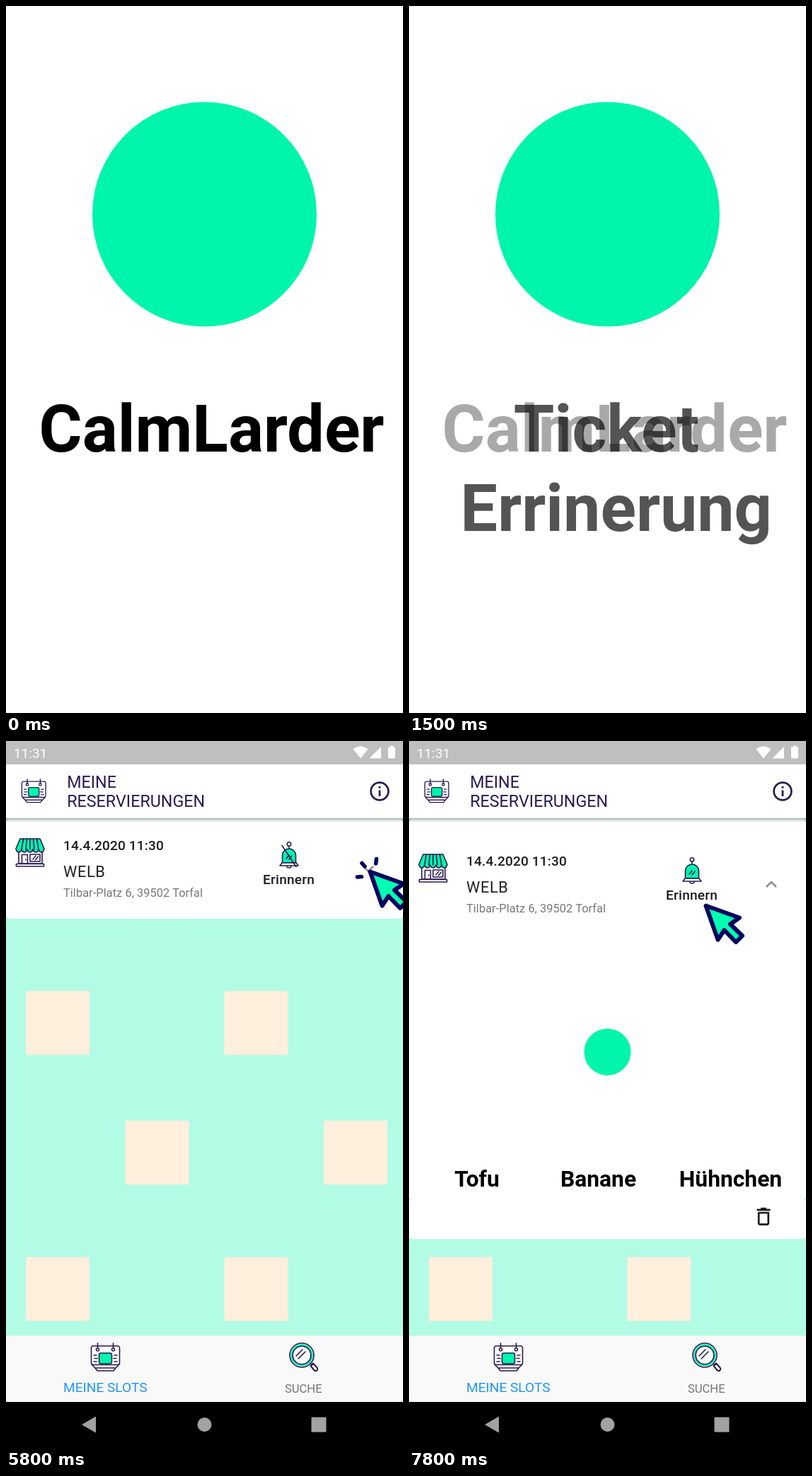
An HTML page without scripts for the animation above (8 s loop, 561 by 998 pixels).

```html
<!DOCTYPE html>
<html lang="de">
<head>
<meta charset="utf-8">
<title>Ticket Erinnerung</title>
<style>
  html, body { margin: 0; width: 100%; height: 100%; overflow: hidden; background: #fff; }
  svg { display: block; }
  .stage { width: 100vw; height: 100vh; }
  text { font-family: Roboto, "Open Sans", sans-serif; }
  .mid { text-anchor: middle; }
  .title { font-size: 93.4px; font-weight: 700; }
  .head { font-size: 23.3px; fill: #2a1a52; }
  .date { font-size: 19.1px; font-weight: 500; letter-spacing: .14px; fill: #1c1c1c; }
  .shop { font-size: 21.8px; letter-spacing: .6px; fill: #212121; }
  .addr { font-size: 16.4px; letter-spacing: .05px; fill: #777; }
  .remind { font-size: 19.1px; font-weight: 500; letter-spacing: .25px; fill: #1c1c1c; }
  .item { font-size: 31.8px; font-weight: 700; }
  .line { fill: none; stroke: #2a1a52; stroke-width: 1.6; stroke-linecap: round; stroke-linejoin: round; }
  .mint { fill: #00f5ac; }
  .pale { fill: #fff; }
  .chev { fill: none; stroke: #8d8d8d; stroke-width: 2.6; }
  .ink { fill: none; stroke: #04005f; stroke-width: 6; stroke-linecap: round; stroke-linejoin: round; }

  /* Everything shares one 8 s clock; values hold until the next key */
  .out, .in, .app, .closed, .open, .row, .cursor, .pos, .rays, .slash { animation: 8s step-end infinite; }
  .out { animation-name: out; }
  .in { animation-name: in; }
  .app { animation-name: app; }
  .open { animation-name: open; }
  .closed { animation-name: closed; }
  .row { animation-name: row; }
  .cursor { animation-name: cursor; }
  .pos { animation-name: pos; }
  .rays { animation-name: rays; }
  .slash { animation-name: slash; }

  @keyframes out {
    0% { opacity: 1; }
    12.5% { opacity: 1; animation-timing-function: steps(9, start); }
    23.75%, 100% { opacity: 0; }
  }
  @keyframes in {
    0% { opacity: 0; }
    12.5% { opacity: 0; animation-timing-function: steps(9, start); }
    23.75%, 100% { opacity: 1; }
  }
  @keyframes app { 0% { opacity: 0; } 47.5%, 100% { opacity: 1; } }
  @keyframes open { 0% { opacity: 0; } 75%, 100% { opacity: 1; } }
  @keyframes closed { 0% { opacity: 1; } 75%, 100% { opacity: 0; } }
  @keyframes row { 0% { transform: none; } 75%, 100% { transform: translateY(22px); } }
  @keyframes cursor { 0% { opacity: 0; } 60%, 100% { opacity: 1; } }
  @keyframes pos {
    0% { transform: translate(511px, 181px); }
    75% { transform: translate(511px, 197px); }
    81.25% { transform: translate(511px, 197px); animation-timing-function: steps(4, start); }
    86.25% { transform: translate(394px, 183px); }
    93.75% { transform: translate(394px, 183px); animation-timing-function: steps(4, start); }
    98.75%, 100% { transform: translate(416px, 229px); }
  }
  @keyframes rays {
    0% { opacity: 0; }
    72.5% { opacity: 1; }
    75% { opacity: 0; }
    91.25% { opacity: 1; }
    93.75%, 100% { opacity: 0; }
  }
  @keyframes slash { 0% { opacity: 1; } 93.75%, 100% { opacity: 0; } }
</style>
</head>
<body>
<svg class="stage" viewBox="0 0 561 998">
  <defs>
    <pattern id="tiles" y="300" width="280.5" height="375.5" patternUnits="userSpaceOnUse">
      <path fill="#ffefdc" d="M28 53h90v90h-90zM168.500 236h90v90h-90z"/>
    </pattern>
    <linearGradient id="shade" x2="0" y2="1">
      <stop stop-opacity=".26"/>
      <stop offset="1" stop-opacity="0"/>
    </linearGradient>
    <g id="calendar" class="line">
      <path class="pale" d="M3 5H38a2.500 2.500 0 0 1 2.500 2.500V29a2.500 2.500 0 0 1 -2.500 2.500H3a2.500 2.500 0 0 1 -2.500 -2.500V7.500A2.500 2.500 0 0 1 3 5z"/>
      <path d="M1.500 31.500L6 36H35L39.500 31.500M6 36L9 40H32L35 36"/>
      <path d="M9.500 1v9M31.500 1v9"/>
      <circle class="pale" cx="9.500" cy="10" r="2"/>
      <circle class="pale" cx="31.500" cy="10" r="2"/>
      <rect class="mint" x="11.500" y="15" width="18" height="15" rx="2.500"/>
      <path d="M4 18h4M5 22.500h4M4 27h4M33 18h4M32 22.500h4M33 27h4"/>
    </g>
  </defs>

  <rect width="561" height="998" fill="#fff"/>
  <circle class="mint" cx="280.500" cy="294" r="158.500"/>
  <text class="title mid out" x="290.500" y="629">CalmLarder</text>
  <g class="title mid in">
    <text x="279" y="629">Ticket</text>
    <text x="292.800" y="741">Errinerung</text>
  </g>

  <g class="app">
    <rect width="561" height="998" fill="#b2fbe4"/>
    <rect y="240" width="561" height="600" fill="url(#tiles)"/>

    <rect class="closed pale" y="110" width="561" height="141" rx="5"/>
    <g class="open">
      <rect class="pale" y="110" width="561" height="537.500" rx="5"/>
      <rect class="pale" y="647" width="561" height="56" rx="5"/>
      <circle class="mint" cx="280.500" cy="439" r="33"/>
      <g class="item mid">
        <text x="96" y="628.500">Tofu</text>
        <text x="267.500" y="628.500">Banane</text>
        <text x="454.500" y="628.500">Hühnchen</text>
      </g>
      <path fill="none" stroke="#1c1c1c" stroke-width="2.700" d="M494.200 666v14.500a1.800 1.800 0 0 0 1.800 1.800h10a1.800 1.800 0 0 0 1.800 -1.800V666zM491.500 661.800h19M497 660.200h8"/>
    </g>

    <g class="row">
      <!-- shop -->
      <g class="line">
        <path class="pale" d="M18 152h33v21h-33z"/>
        <path class="mint" d="M20 138h28l6 14q-1 5 -4 5q-3 0 -4 -4q-1 4 -4 4q-3 0 -4 -4q-1 4 -4 4q-3 0 -4 -4q-1 4 -4 4q-3 0 -4 -4q-1 4 -4 4q-3 0 -4 -5z"/>
        <path d="M24.500 138L22 153M29.500 138L28 153M34 138v15M38.500 138L40 153M43.500 138L46 153"/>
        <path d="M22.500 173v-12.500h8v12.500M28 167v1"/>
        <path d="M34 160h14v10h-14zM38 167l4 -5M41.500 168l4 -5"/>
        <path class="pale" d="M14.500 173.500h39v3.500h-39z"/>
      </g>
      <text class="date" x="81" y="154">14.4.2020 11:30</text>
      <text class="shop" x="81" y="192">WELB</text>
      <text class="addr" x="81" y="220">Tilbar-Platz 6, 39502 Torfal</text>
      <!-- bell -->
      <g class="line">
        <circle cx="400" cy="145.500" r="2.700"/>
        <path d="M400 148.500v3.500"/>
        <path class="mint" d="M390.500 172V161.500a9.500 9.500 0 0 1 19 0V172z"/>
        <path class="pale" d="M390 172h20l3 4h-26z"/>
        <path d="M397 177a3 2 0 0 0 6 0M396 166l4 -5M400 167l4 -5"/>
        <path class="slash" d="M390 147.500L410 177.500"/>
      </g>
      <text class="remind mid" x="399.600" y="202">Erinnern</text>
    </g>
    <path class="chev closed" d="M505 177l7 7l7 -7"/>
    <path class="chev open" d="M505 206l7 -7l7 7"/>

    <!-- header -->
    <rect y="109" width="561" height="6" fill="url(#shade)"/>
    <rect class="pale" y="33" width="561" height="76"/>
    <use href="#calendar" transform="translate(22 53) scale(.84)"/>
    <text class="head" x="86.200" y="66">MEINE</text>
    <text class="head" x="86.200" y="93">RESERVIERUNGEN</text>
    <circle cx="528" cy="71" r="12.400" fill="none" stroke="#2a1a52" stroke-width="2.700"/>
    <path d="M528 69.500v8.500M528 64v2.800" stroke="#2a1a52" stroke-width="2.800"/>

    <!-- status bar -->
    <rect width="561" height="33" fill="#bfbfbf"/>
    <g fill="#fff">
      <text x="10.800" y="23.800" font-size="19.100">11:31</text>
      <path d="M490.500 11.500q10.500 -8 21 0L501 24.500z"/>
      <path d="M513.500 24.500h16.500v-16.500z"/>
      <path d="M540 9.500q0 -1 1 -1h2v-1.800h4v1.800h2q1 0 1 1v14q0 1 -1 1h-8q-1 0 -1 -1z"/>
    </g>

    <!-- tabs -->
    <rect y="839.500" width="561" height="94" fill="#f9f9f9"/>
    <use href="#calendar" x="120" y="849"/>
    <g class="line">
      <path class="pale" stroke-width="2" d="M430.500 882l3.500 -3.500l5.500 6q1.500 2 0 3.700q-1.700 1.700 -3.700 .300z"/>
      <path d="M429 878l3 3"/>
      <circle class="pale" cx="418" cy="867" r="17"/>
      <circle cx="418" cy="867" r="14.500" style="stroke:#00f5ac;stroke-width:2.400"/>
      <circle cx="418" cy="867" r="12.800"/>
      <path d="M410 868l9 -9M413 872l10 -10"/>
    </g>
    <text class="mid" x="140.300" y="919" font-size="19.100" fill="#2196f3">MEINE SLOTS</text>
    <text class="mid" x="420.300" y="919.500" font-size="16.600" fill="#757575">SUCHE</text>

    <!-- system keys -->
    <rect y="933" width="561" height="65"/>
    <g fill="#a2a2a2">
      <path d="M107 965l20 -11.500v23z"/>
      <circle cx="280.500" cy="965" r="10"/>
      <rect x="431.500" y="954.500" width="21" height="21" rx="1"/>
    </g>

    <g class="cursor">
      <g class="pos">
        <path class="ink" style="fill:#00ffb0" d="M3.500 3.500L51 20.500L38 29.500L55 46L46 55L29.500 38L20.500 51.500z"/>
        <path class="ink rays" style="stroke-width:5.600" d="M-14.500 11l6 -.500M-8 -8.500l4 4.500M12.500 -14.500l-.800 6.500"/>
      </g>
    </g>
  </g>
</svg>
</body>
</html>
```
